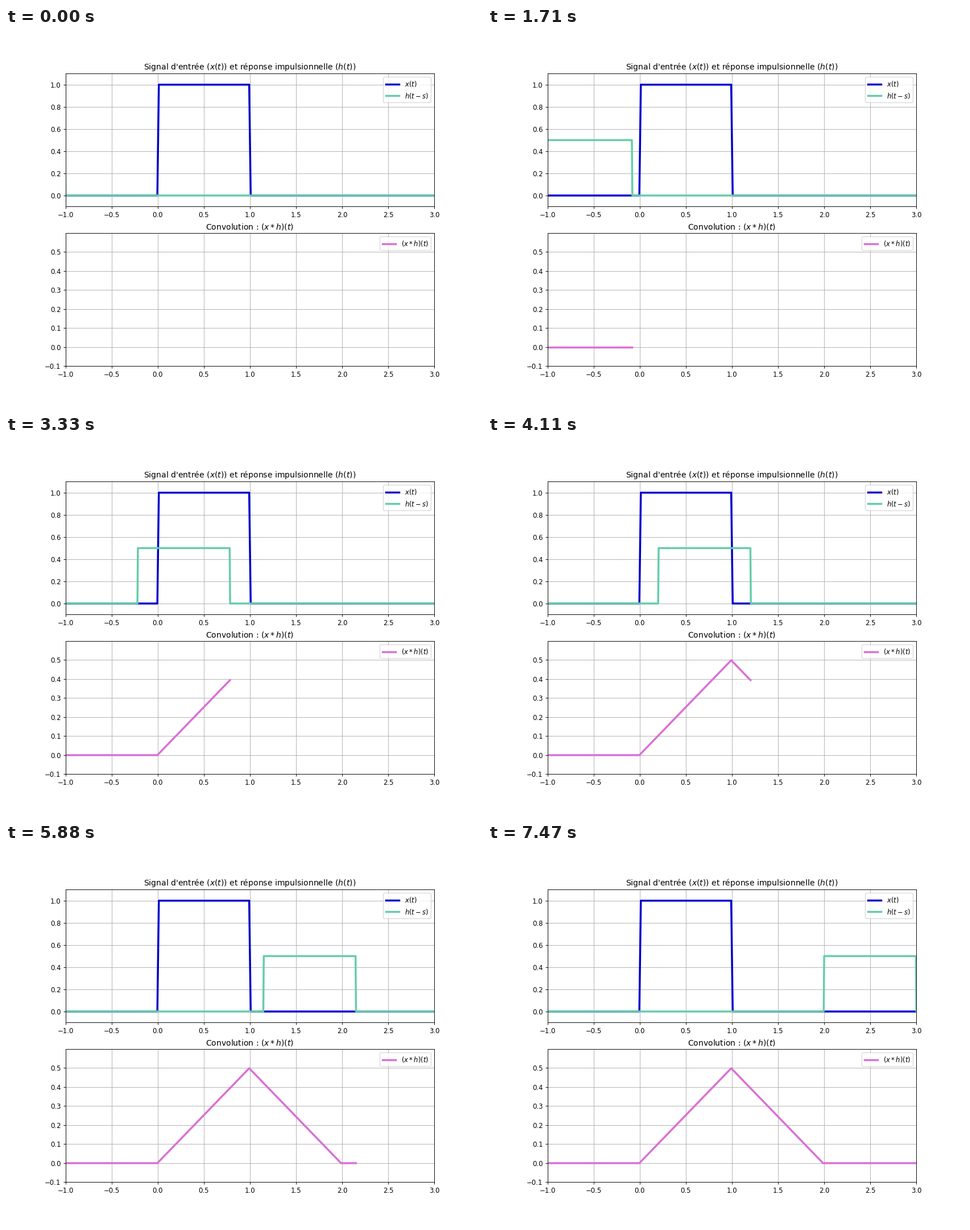
A matplotlib script that plays this animation: 837x669 px, repeating every 7.5 s.

```python
import numpy as np
import matplotlib.pyplot as plt
from matplotlib.animation import FuncAnimation

DPI = 83.7
FRAMES, INTERVAL = 250, 30
STEP = 0.005  # sampling step of the sliding response
EPS = 1e-6    # guards against float truncation

t = np.linspace(-1, 3, FRAMES)
dt = t[1] - t[0]
x = np.where((t >= 0) & (t <= 1), 1.0, 0.0)

# Convolution of two sampled pulses: a triangle, n samples on each side
n = int(x.sum())
peak = int(np.flatnonzero(x)[-1])
conv = 0.5 * dt * np.maximum(0, n - np.abs(np.arange(FRAMES) - peak))


def snap(v):
    return np.ceil(v / STEP - EPS) * STEP


def response(now):
    """Outline of h(now - s), with edges on the sampling grid."""
    left, right = snap(now - 1), snap(now)
    s = [-3, left - STEP, left, right - STEP, right, 5]
    return s, [0, 0, 0.5, 0.5, 0, 0]


def setup(ax, title, top):
    ax.set_title(title)
    ax.set_xlim(-1, 3)
    ax.set_ylim(-0.1, top)
    ax.grid(True)
    ax.legend(loc="upper right")


fig, (ax_in, ax_out) = plt.subplots(
    2, 1, figsize=(837 / DPI + EPS, 669 / DPI + EPS), dpi=DPI)

ax_in.plot(t, x, color="mediumblue", lw=3, label="$x(t)$")
h_line, = ax_in.plot([], [], color="mediumaquamarine", lw=3,
                     label="$h(t-s)$")
conv_line, = ax_out.plot([], [], color="orchid", lw=3,
                         label="$(x * h)(t)$")

setup(ax_in, "Signal d'entrée ($x(t)$) et réponse impulsionnelle ($h(t)$)",
      1.1)
setup(ax_out, "Convolution : $(x * h)(t)$", conv.max() + 0.1)


def update(i):
    h_line.set_data(*response(t[i]))
    conv_line.set_data(t[:i + 1], conv[:i + 1])
    return h_line, conv_line


anim = FuncAnimation(fig, update, frames=FRAMES, interval=INTERVAL,
                     blit=True, repeat=True, repeat_delay=0)
plt.show()
```
